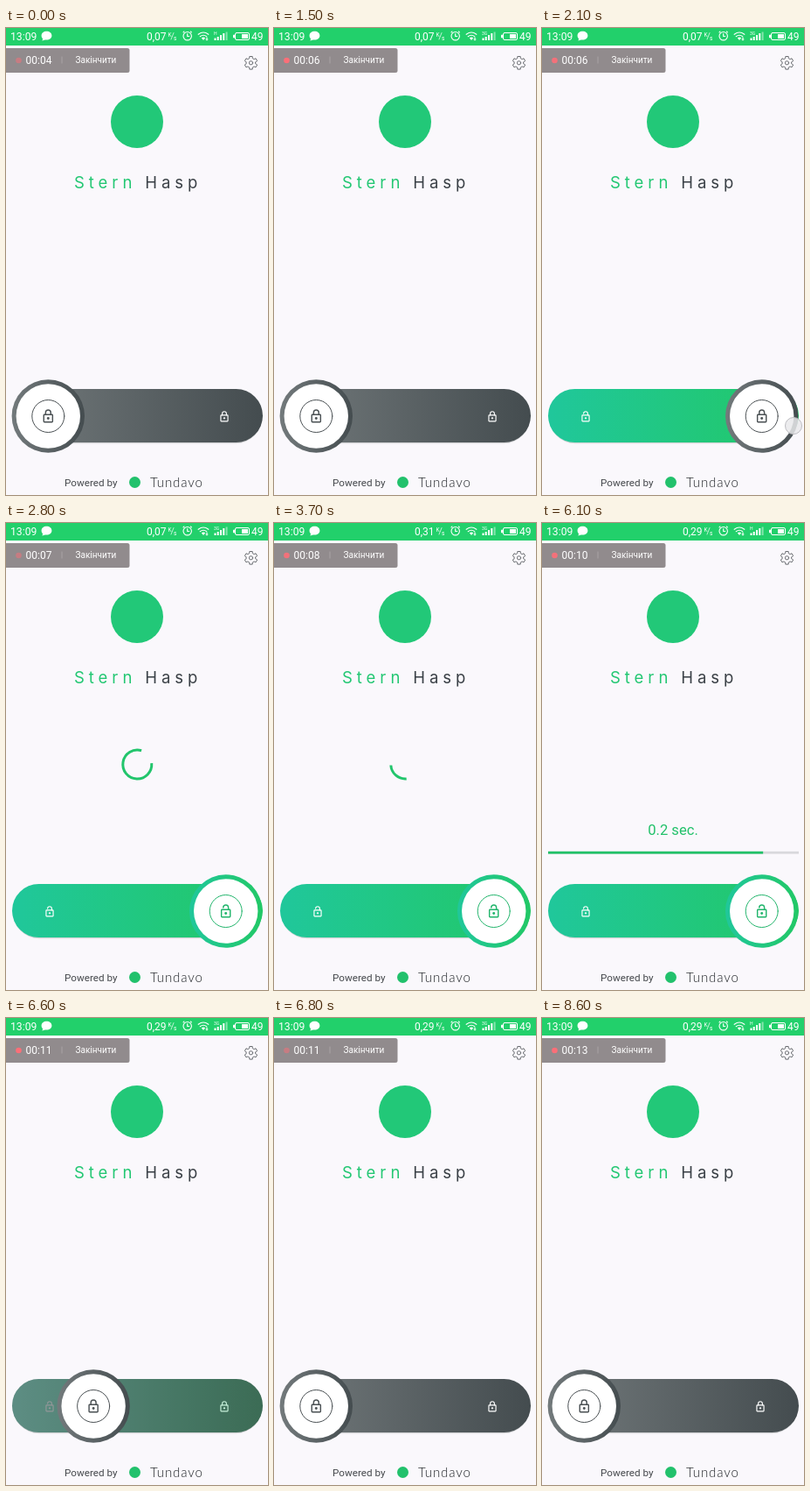
Animation, 300 px wide and 533 px high, one loop 8.7 s. Source, as an HTML page:

```html
<!DOCTYPE html>
<html lang="uk">
<head>
<meta charset="utf-8">
<title>Slide to unlock</title>
<style>
html, body { margin: 0; width: 100%; height: 100%; overflow: hidden; background: #faf8fc; }
svg { display: block; width: 100%; height: 100%; }
text { font-family: Roboto, "Noto Sans", sans-serif; white-space: pre; }
.brand { font: 400 18.5px Inter, Lato, sans-serif; letter-spacing: 4.9px; }
.maker { font: 300 15px Lato, sans-serif; letter-spacing: .9px; }
.line { fill: none; stroke: currentColor; stroke-linecap: round; stroke-linejoin: round; }
</style>
</head>
<body>
<svg viewBox="0 0 300 533" xmlns="http://www.w3.org/2000/svg">
  <defs>
    <linearGradient id="green"><stop stop-color="#20c79b"/><stop offset="1" stop-color="#22c866"/></linearGradient>
    <linearGradient id="grey"><stop stop-color="#737a7c"/><stop offset="1" stop-color="#444c4f"/></linearGradient>
    <g id="body">
      <rect class="line" x="-7" y="-2.5" width="14" height="12" rx="1" stroke-width="2"/>
      <circle cy="3.5" r="2" fill="currentColor"/>
    </g>
    <g id="closed"><use href="#body"/><path class="line" stroke-width="2" d="M-4.100-2.500V-5.500a4.100 4.100 0 0 1 8.200 0V-2.500"/></g>
    <g id="opened"><use href="#body"/><path class="line" stroke-width="2" d="M-4.100-5.500a4.100 4.100 0 0 1 8.200 0V-2.500"/></g>
  </defs>
  <rect width="300" height="533" fill="#faf8fc"/>

  <rect width="300" height="20" fill="#22d06b"/>
  <g fill="#fff" color="#fff">
    <text x="5" y="13.700" font-size="12.200">13:09</text>
    <path d="M46.500 3.800c3.400 0 5.900 2.100 5.900 4.900s-2.500 4.900-5.900 4.900l-1.600-.2-3.400 1.200.6-2.400c-.9-.9-1.500-2.100-1.500-3.500C40.600 5.900 43.100 3.800 46.500 3.800z"/>
    <text id="speed" x="161" y="13.500" font-size="12"></text>
    <text x="185.500" y="9.500" font-size="6.500">K</text>
    <path class="line" d="M189 13L192 5.500" stroke-width=".7"/>
    <text x="192" y="14" font-size="6.500">s</text>
    <g class="line" stroke-width="1.100">
      <circle cx="207.700" cy="9.200" r="4.700"/>
      <path d="M207.700 6.600V9.500h2M203 4.900l1-.9M212.400 4.900l-1-.9M220.200 7.300q5.800-4.600 11.600 0M222.200 9.700q3.800-3 7.600 0"/>
    </g>
    <path d="M223.800 11.300q2.200-1.500 4.400 0L226 13.900z"/>
    <path d="M230 10.500l1.600 2h-3.200zM230 14.500l1.600-1.500h-3.200z"/>
    <text id="net" x="238" y="8" font-size="5"></text>
    <path d="M238.500 11.500h2v2.500h-2zM241.700 10h2v4h-2zM245 8h2v6h-2zM248.300 6h2v8h-2z"/>
    <path d="M251.600 4.500h2V14h-2z" opacity=".45"/>
    <rect class="line" x="262.500" y="5.500" width="16" height="8" rx="1.500"/>
    <path d="M260 7.800h2v3.500h-2zM270 7h7v5h-7z"/>
    <text x="281" y="13.500" font-size="12">49</text>
  </g>

  <path d="M0 23H139q2.500 0 2.500 2.500V48.500q0 2.500-2.500 2.500H0z" fill="#918b8d"/>
  <circle id="dot" cx="14.500" cy="37" r="3.300" fill="#fb6f78"/>
  <text id="clock" x="22.500" y="41" font-size="12" fill="#fff"></text>
  <path d="M64 32.500v8" stroke="#a9a3a5"/>
  <text x="79.500" y="40.300" font-size="10" fill="#fff">Закінчити</text>
  <path id="gear" class="line" color="#6b6e72"/>
  <circle class="line" cx="280.500" cy="39.800" r="2.100" color="#6b6e72"/>

  <circle cx="150" cy="107" r="30" fill="#22c878"/>
  <text class="brand" x="78" y="183" fill="#22c772">Stern<tspan fill="#3a4046"> Hasp</tspan></text>

  <path id="spinner" class="line" color="#22c56c" stroke-width="3" style="stroke-linecap:butt"/>
  <g id="timer">
    <text id="left" x="150" y="356" font-size="16.600" text-anchor="middle" fill="#22c16a"></text>
    <rect x="7" y="374.800" width="287" height="2.800" fill="#d9d8dc"/>
    <rect id="fill" x="7" y="374.800" height="2.800" fill="#22c168"/>
  </g>

  <rect x="8" y="414" width="285" height="60.200" rx="30" fill="#d3d4d6"/>
  <g id="shutTrack">
    <rect x="7" y="412" width="287" height="61" rx="30.500" fill="url(#grey)"/>
    <use href="#closed" transform="translate(250 443.300) scale(.580)" color="#fff"/>
  </g>
  <g id="openTrack">
    <rect x="7" y="412" width="287" height="61" rx="30.500" fill="url(#green)"/>
    <use href="#opened" transform="translate(50 443.300) scale(.580)" color="#fff"/>
  </g>
  <g id="thumb">
    <circle id="ring" r="41.700"/>
    <circle r="36.700" fill="#fff"/>
    <g id="badge">
      <circle class="line" r="18.500" stroke-width="1"/>
      <use id="icon" transform="scale(.720)"/>
    </g>
  </g>
  <circle id="touch" cx="76" cy="449" r="9.500" fill="#e9e9eb" fill-opacity=".85" stroke="#bdbdc1"/>

  <text x="67" y="523.300" font-size="11.700" fill="#45484c">Powered by</text>
  <circle cx="147.500" cy="518.500" r="6.500" fill="#22c16c"/>
  <text class="maker" x="165" y="524" fill="#202428">Tundavo</text>
</svg>
<script>
const LOOP = 8700;
const DRAG = [1800, 2100], RELEASE = 2200, COUNT = 4400, RELOCK = 6400, BACK = 6700;
const el = Object.fromEntries([...document.querySelectorAll('svg [id]')].map(n => [n.id, n]));
const clamp = x => Math.min(1, Math.max(0, x));
const ease = x => (x = clamp(x), x * x * (3 - 2 * x));
const mix = (a, b, p) => a + (b - a) * p;
const show = (node, on) => node.setAttribute('visibility', on ? 'visible' : 'hidden');
const set = (node, attrs) => { for (const k in attrs) node.setAttribute(k, attrs[k]); };
const polar = (cx, cy, r, deg) => {
  const a = deg * Math.PI / 180;
  return (cx + r * Math.cos(a)).toFixed(2) + ' ' + (cy + r * Math.sin(a)).toFixed(2);
};

const teeth = [];
for (let a = 30; a < 390; a += 60)
  for (const [d, r] of [[-19, 5.5], [-13, 7.5], [13, 7.5], [19, 5.5]]) teeth.push(polar(280.5, 39.8, r, a + d));
el.gear.setAttribute('d', 'M' + teeth.join('L') + 'Z');

// Indeterminate spinner: the head runs ahead, then the tail catches up.
function spinnerPath(t) {
  const u = (t - 2147) / 1333, n = Math.floor(u), f = u - n;
  const tail = 85 + 0.2 * (t - 3700) + 270 * (n - 1 + ease(f * 2 - 1));
  const sweep = 22 + 270 * (ease(f * 2) - ease(f * 2 - 1));
  const at = deg => polar(150.3, 275.5, 16.5, deg);
  return `M${at(tail)}A16.5 16.5 0 ${sweep > 180 ? 1 : 0} 1 ${at(tail + sweep)}`;
}

function draw(t) {
  el.speed.textContent = t < 2900 ? '0,07' : t < 5600 ? '0,31' : '0,29';
  el.net.textContent = t < 900 || (t >= 5600 && t < 6400) || t > 8100 ? 'H' : '3G';
  el.clock.textContent = '00:' + String(4 + Math.floor((t + 600) / 1000)).padStart(2, '0');
  const blink = Math.max(0, Math.cos((t - 900) * Math.PI / 500));
  el.dot.setAttribute('opacity', 1 - 0.75 * blink * blink);

  const drag = ease((t - DRAG[0]) / (DRAG[1] - DRAG[0]));
  const pos = t < RELOCK ? drag : 1 - ease((t - RELOCK) / (BACK - RELOCK));
  const open = t >= RELEASE && t < RELOCK;
  el.thumb.setAttribute('transform', `translate(${mix(48.3, 251.7, pos)} 443)`);
  el.openTrack.setAttribute('opacity', pos);
  show(el.shutTrack, pos < 1);
  el.ring.setAttribute('fill', open ? 'url(#green)' : 'url(#grey)');
  el.badge.setAttribute('color', open ? '#22b56c' : '#4b5154');
  el.icon.setAttribute('href', open ? '#opened' : '#closed');

  show(el.touch, t >= DRAG[0] && t < RELEASE);
  set(el.touch, { cx: mix(76, 288, drag), cy: mix(449, 454, drag) });

  show(el.spinner, t >= RELEASE && t < COUNT);
  el.spinner.setAttribute('d', spinnerPath(t));

  show(el.timer, t >= COUNT && t < RELOCK);
  const ticks = Math.floor(Math.max(0, t - 4600) * 1.2 / 100 + 0.01);
  el.left.textContent = (Math.max(0, 20 - ticks) / 10).toFixed(1) + ' sec.';
  el.fill.setAttribute('width', 287 * clamp((t - 4600) / 1750));
}

const start = performance.now();
function tick() {
  draw((performance.now() - start) % LOOP);
  requestAnimationFrame(tick);
}
tick();
</script>
</body>
</html>
```
